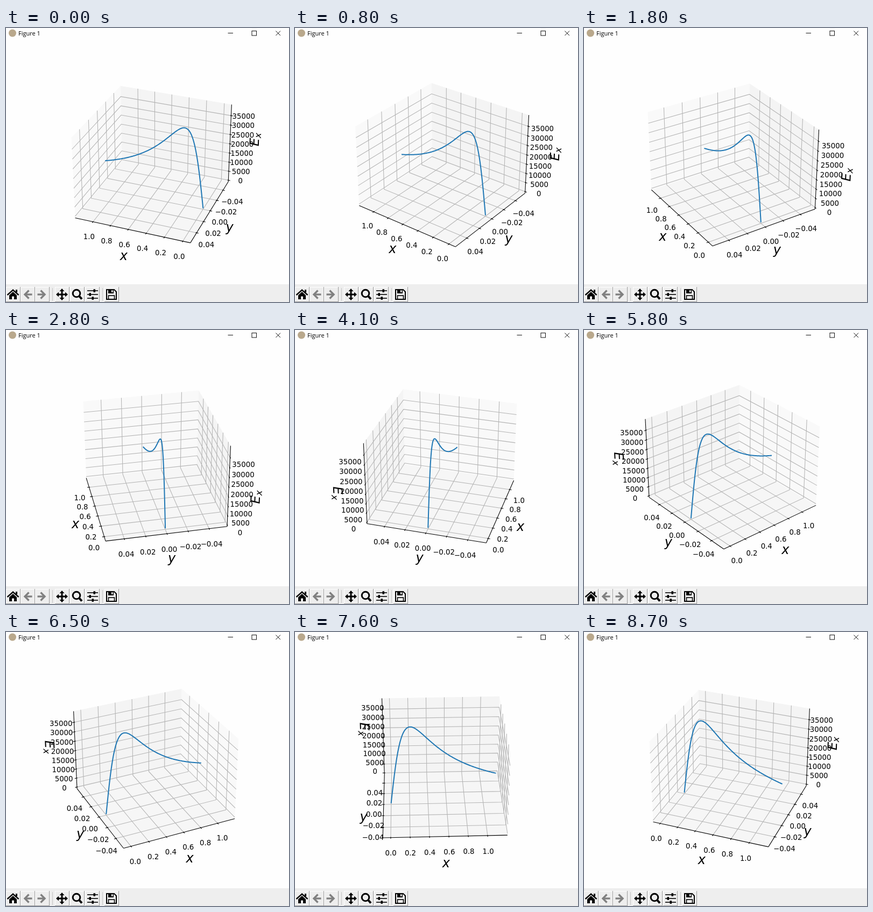
Write an HTML page with a canvas that moves like this. It is 526 px wide and 510 px high and loops after 8800 ms.

```html
<!DOCTYPE html>
<html lang="en">
<head>
<meta charset="utf-8">
<title>Figure 1</title>
<style>
  html, body { margin: 0; width: 100%; height: 100%; overflow: hidden; background: #fefefe; }
  canvas { display: block; }
</style>
</head>
<body>
<canvas id="stage" width="526" height="510"></canvas>
<script>
const ctx = document.getElementById('stage').getContext('2d');
const FONT = '"DejaVu Sans", sans-serif';
const LOOP = 8800, STEP = 100;

// Camera: [step, azimuth in degrees]
const TURN = [[0, 111], [8, 127], [28, 167.9], [41, 196], [51, 215.6], [65, 244.8], [87, 291]];
const ELEVATION = Math.PI / 6, DISTANCE = 10, SCALE = 189.1, CENTER = [275, 247.3];

// Box half sizes, including the small margin around the data limits
const HALF = [0.5952, 0.5952, 0.4464];
const TICK_PAD = [0.1, 0.1, 0.075];
const LABEL_PAD = TICK_PAD.map(v => v * 2.06);
const X_MAX = 1.124, Z_MAX = 39900;

const toBox = [
  x => 0.5195 * (2 * x / X_MAX - 1),
  y => y / 0.055 * 0.5714,
  z => 0.8571 * (z / Z_MAX - 0.5)
];
const range = (from, to) => Array.from({ length: to - from + 1 }, (_, i) => from + i);

// beside: the two other axes; edge: which side (near = 1, far = -1) the axis line lies on
const AXES = [
  { beside: [1, 2], edge: [0, 1, -1], tickDir: 1, pane: '#f9f9f9', label: 'x',
    ticks: range(0, 5).map(k => [k / 5, (k / 5).toFixed(1)]) },
  { beside: [0, 2], edge: [1, 0, -1], tickDir: 0, pane: '#f4f4f4', label: 'y',
    ticks: range(-2, 2).map(k => [k / 50, (k < 0 ? '\u2212' : '') + Math.abs(k / 50).toFixed(2)]) },
  { beside: [0, 1], edge: [1, -1, 0], tickDir: 0, pane: '#f6f6f6', label: '',
    ticks: range(0, 7).map(k => [k * 5000, String(k * 5000)]) }
];

function azimuthAt(step) {
  const i = Math.max(1, TURN.findIndex(([s]) => s >= step));
  const [s0, a0] = TURN[i - 1], [s1, a1] = TURN[i];
  return (a0 + (a1 - a0) * (step - s0) / (s1 - s0)) * Math.PI / 180;
}

function makeProjection(az) {
  const c = Math.cos(az), s = Math.sin(az);
  const ce = Math.cos(ELEVATION), se = Math.sin(ELEVATION);
  return ([x, y, z]) => {
    const toEye = c * x + s * y;
    const k = SCALE / (1 - (ce * toEye + se * z) / DISTANCE);
    return [CENTER[0] + k * (c * y - s * x), CENTER[1] - k * (ce * z - se * toEye)];
  };
}

function path(points, color, width, fill) {
  ctx.beginPath();
  points.forEach(([x, y]) => ctx.lineTo(x, y));
  if (fill) {
    ctx.fillStyle = fill;
    ctx.fill();
  }
  if (color) {
    ctx.strokeStyle = color;
    ctx.lineWidth = width;
    ctx.stroke();
  }
}

function rect(x, y, w, h, color) {
  ctx.fillStyle = color;
  ctx.fillRect(x, y, w, h);
}

function disc(x, y, r, color) {
  ctx.beginPath();
  ctx.arc(x, y, r, 0, 7);
  ctx.fillStyle = color;
  ctx.fill();
}

// Text whose ink is centred on the point
function inkText(text, x, y) {
  const m = ctx.measureText(text);
  ctx.fillText(text, x, y + (m.actualBoundingBoxAscent - m.actualBoundingBoxDescent) / 2);
}

function drawPlot(az) {
  const project = makeProjection(az);
  const near = [Math.sign(Math.cos(az)) || 1, Math.sign(Math.sin(az)) || 1, 1];
  const side = (axis, dir) => dir * near[axis] * HALF[axis];
  const point = (i, value, j, dirJ, k, dirK) => {
    const p = [];
    p[i] = value; p[j] = side(j, dirJ); p[k] = side(k, dirK);
    return project(p);
  };

  AXES.forEach(({ beside: [j, k], pane }, i) => {
    const corners = [[-1, -1], [-1, 1], [1, 1], [1, -1]];
    path(corners.map(([a, b]) => point(i, side(i, -1), j, a, k, b)), null, 0, pane);
  });

  AXES.forEach(({ beside: [j, k], ticks }, i) => ticks.forEach(([value]) => {
    const v = toBox[i](value);
    path([[1, -1], [-1, -1], [-1, 1]].map(([a, b]) => point(i, v, j, a, k, b)), '#b4b4b4', 1.07);
  }));

  ctx.textAlign = 'center';
  AXES.forEach(({ edge, tickDir, ticks, label }, i) => {
    const onAxis = (v, pads) => edge.map((dir, a) => {
      if (a === i) return v;
      const base = side(a, dir);
      return base + Math.sign(base) * (pads ? pads[a] : 0);
    });
    const ends = [-HALF[i], HALF[i]].map(v => project(onAxis(v)));
    path(ends, '#000', 1.07);

    ctx.font = '13.3px ' + FONT;
    ctx.fillStyle = '#000';
    ticks.forEach(([value, text]) => {
      const v = toBox[i](value);
      const mark = [-0.0095, 0.019].map(reach => {
        const pads = [0, 0, 0];
        pads[tickDir] = reach;
        return project(onAxis(v, pads));
      });
      path(mark, '#000', 1.07);
      const [x, y] = project(onAxis(v, TICK_PAD));
      ctx.fillText(text, x, y + 10.6);
    });

    const [x, y] = project(onAxis(0, LABEL_PAD));
    ctx.font = 'italic 24px ' + FONT;
    if (label) inkText(label, x, y + 2);
    else drawFieldLabel(x, y + 2, ends);
  });

  const R = 0.22;
  const curve = range(0, 160).map(n => {
    const x = X_MAX * n / 160;
    return project([toBox[0](x), 0, toBox[2](Z_MAX * 2 * R * x / (x * x + R * R))]);
  });
  ctx.lineCap = 'square';
  path(curve, '#1f77b4', 2);
  ctx.lineCap = 'butt';
}

// "E" with subscript "x", turned along the vertical axis
function drawFieldLabel(x, y, [low, high]) {
  const dx = high[0] - low[0], dy = high[1] - low[1];
  ctx.save();
  ctx.translate(x, y);
  ctx.rotate(Math.atan2(dy, dx) + (dx < 0 ? Math.PI : 0));
  ctx.fillText('E', -5, 7);
  ctx.font = 'italic 16.8px ' + FONT;
  ctx.fillText('x', 7.6, 10.4);
  ctx.restore();
}

function drawTitleBar() {
  disc(12, 9.5, 7, '#b9a88c');
  ctx.font = '11px "Open Sans", sans-serif';
  ctx.textAlign = 'left';
  ctx.fillStyle = '#000';
  ctx.fillText('Figure 1', 23, 14);
  path([[412.5, 9.5], [422, 9.5]], '#111', 1);
  ctx.strokeRect(457, 5.5, 8.5, 8.5);
  path([[501.5, 5.5], [510, 14]], '#111', 1);
  path([[510, 5.5], [501.5, 14]], '#111', 1);
}

function arrowIcon(x, dir) {
  path([[x + 8.5 * dir, 496], [x - 5 * dir, 496]], '#808080', 3.4);
  path([[x + 2.5 * dir, 488.5], [x - 5 * dir, 496], [x + 2.5 * dir, 503.5]], '#808080', 3.4);
}

function moveIcon(x, y) {
  ctx.save();
  ctx.translate(x, y);
  for (let i = 0; i < 4; i++) {
    path([[0, 0], [0, -8]], '#000', 3);
    path([[-4.5, -6], [0, -11], [4.5, -6]], null, 0, '#000');
    ctx.rotate(Math.PI / 2);
  }
  ctx.restore();
}

function drawToolbar() {
  rect(0, 477, 526, 33, '#eeeeee');
  [0, 27, 54, 91, 119, 147, 183].forEach(x => {
    rect(x, 482, 27, 1, '#fff');
    rect(x, 482, 1, 27, '#fff');
    rect(x + 26, 482, 1, 28, '#9a9a9a');
    rect(x, 509, 27, 1, '#9a9a9a');
  });
  [86, 179].forEach(x => rect(x, 484, 1, 24, '#c4c4c4'));

  path([[2.5, 497], [13, 487.5], [23.5, 497]], '#000', 2.4);
  rect(18, 487, 3, 5, '#000');
  path([[6, 497.5], [13, 491], [20, 497.5], [20, 505], [15, 505], [15, 499.5],
        [11, 499.5], [11, 505], [6, 505]], null, 0, '#000');

  arrowIcon(40, 1);
  arrowIcon(67, -1);
  moveIcon(104, 496);

  ctx.beginPath();
  ctx.arc(131, 494, 6.8, 0, 7);
  ctx.strokeStyle = '#000';
  ctx.lineWidth = 3;
  ctx.stroke();
  path([[136, 499], [141, 504.5]], '#000', 4);

  [[489, 164], [496, 156], [503, 161]].forEach(([y, knob]) => {
    rect(151, y - 0.8, 20, 1.6, '#000');
    rect(knob - 1.5, y - 2.8, 3.5, 5.6, '#000');
  });

  path([[187, 487], [201, 487], [205, 491], [205, 505], [187, 505], [187, 486]], '#000', 2);
  rect(190, 487, 10, 7, '#000');
  rect(196, 488, 2.5, 4, '#eee');
  ctx.lineWidth = 1.6;
  ctx.strokeRect(190.5, 498, 11, 7);
}

function frame() {
  const step = Math.floor(performance.now() % LOOP / STEP);
  rect(0, 0, 526, 510, '#fefefe');
  drawPlot(azimuthAt(step));
  drawTitleBar();
  drawToolbar();
  requestAnimationFrame(frame);
}
frame();
</script>
</body>
</html>
```
